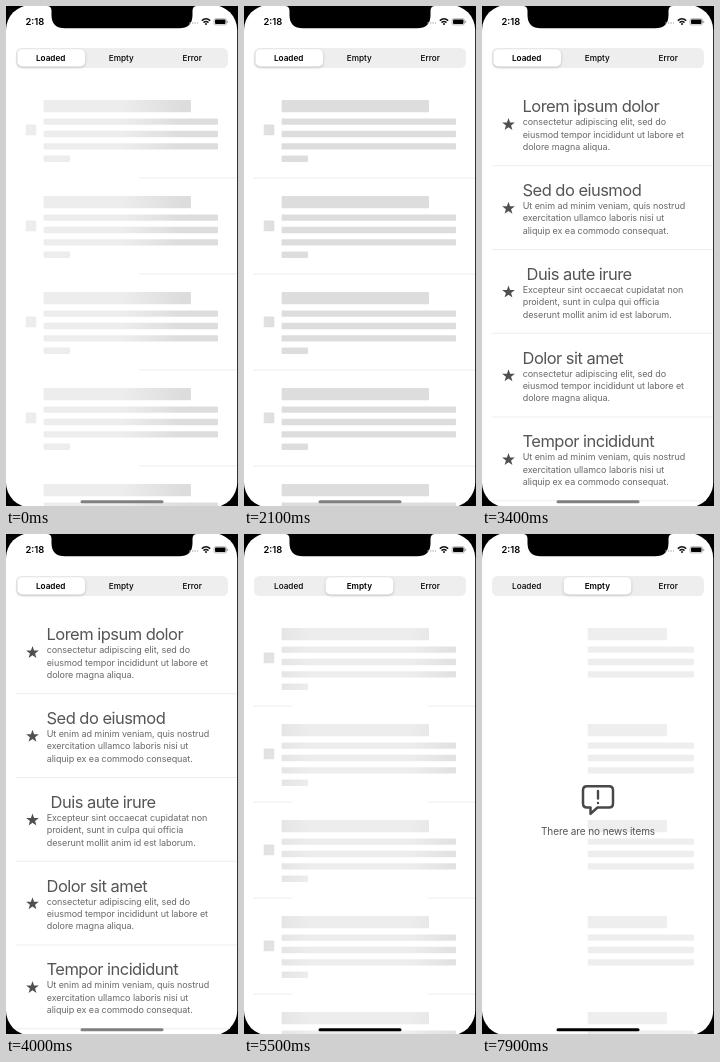
An HTML page for the animation above (8000 ms loop, 232 by 500 pixels).

```html
<!DOCTYPE html>
<html lang="en">
<head>
<meta charset="utf-8">
<style>
  html, body { margin: 0; width: 100%; height: 100%; overflow: hidden; background: #000; }
  svg { display: block; width: 232px; height: 500px; font-family: Inter, Roboto, sans-serif; }
  .tab { font-size: 8.2px; font-weight: 500; text-anchor: middle; }
  .title { font-size: 16.5px; letter-spacing: -.53px; fill: #555; white-space: pre; }
  .body { font-size: 9px; letter-spacing: -.07px; fill: #686868; }
  #thumb { filter: drop-shadow(0 1px 1.5px #0003); }
</style>
</head>
<body>
<svg viewBox="0 0 232 500">
  <defs>
    <linearGradient id="shine" gradientUnits="userSpaceOnUse">
      <stop stop-color="#ddd"/><stop stop-color="#ddd"/>
      <stop stop-color="#ddd"/><stop offset="1" stop-color="#ddd"/>
    </linearGradient>
    <linearGradient id="rule" gradientUnits="userSpaceOnUse">
      <stop stop-color="#ebebeb"/><stop stop-color="#fff"/>
      <stop offset="1" stop-color="#fff"/><stop offset="1" stop-color="#ebebeb"/>
    </linearGradient>
    <clipPath id="screen"><rect y="-1" width="231.2" height="502.5" rx="25"/></clipPath>
  </defs>
  <g clip-path="url(#screen)">
    <rect width="232" height="502" fill="#fff"/>
    <g id="skeleton"><g id="bars" fill="url(#shine)"></g><g id="barRules" fill="url(#rule)"></g></g>
    <g id="list"><g id="rows"></g><g id="rowRules" fill="#ebebeb"></g></g>
    <g id="empty">
      <path d="M105 252.3H127Q131 252.3 131 256.3V269.5Q131 273.5 127 273.5H115.5L108.5 279.8V273.5H105Q101 273.5 101 269.5V256.3Q101 252.3 105 252.3Z"
        fill="none" stroke="#484848" stroke-width="2.5" stroke-linejoin="round"/>
      <path d="M116 257V264.5M116 269V269.1" stroke="#484848" stroke-width="2.4" stroke-linecap="round"/>
      <text x="116" y="301" text-anchor="middle" font-size="10" letter-spacing="-.1" fill="#555">There are no news items</text>
    </g>
    <rect x="10" y="42" width="212" height="20" rx="5.5" fill="#eee"/>
    <rect id="thumb" y="43.3" width="67.5" height="17.2" rx="4.8" fill="#fff"/>
    <text class="tab" x="44.7" y="55">Loaded</text>
    <text class="tab" x="115.3" y="55">Empty</text>
    <text class="tab" x="186.2" y="55">Error</text>
    <path d="M41 0Q45.500 0 45.500 5V9Q45.500 22.300 59 22.300H173Q186.500 22.300 186.500 9V5Q186.500 0 191 0Z"/>
    <text x="19.500" y="19" font-size="9.400" font-weight="600">2:18</text>
    <path d="M183.500 17H192" stroke="#bbb" stroke-width="1.300" stroke-dasharray="1.300 1.200"/>
    <g fill="none" stroke="#111" stroke-width="1.500">
      <path d="M195.800 14.600Q200 10.900 204.200 14.600M197.500 16.600Q200 14.500 202.500 16.600"/>
      <path d="M199 18H201"/>
    </g>
    <rect x="208" y="12.700" width="12.500" height="6.200" rx="1.800" fill="none" stroke="#999" stroke-width=".7"/>
    <rect x="209" y="13.600" width="10.500" height="4.400" rx="1"/>
    <path d="M221.700 14.800V16.800" stroke="#999"/>
    <rect id="home" x="74.500" y="494.200" width="83" height="3" rx="1.500"/>
  </g>
</svg>
<script>
const $ = id => document.getElementById(id);
const rect = (x, y, w, h, r = 1) => `<rect x="${x}" y="${y}" width="${w}" height="${h}" rx="${r}"/>`;
const rules = (first, pitch, n) => Array.from({length: n}, (_, i) => rect(10, first + i * pitch, 221, .9, 0)).join('');

let bars = '';
for (let i = 0; i < 5; i++) {
  const y = 94 + 96 * i;
  bars += rect(37.6, y, 147.4, 12.3) + rect(19.7, y + 24.4, 10.6, 10.8) + rect(37.6, y + 55.6, 26.4, 6.4);
  for (let j = 0; j < 3; j++) bars += rect(37.6, y + 18.4 + 12.4 * j, 174.4, 6.4);
}
$('bars').innerHTML = bars;
$('barRules').innerHTML = rules(171.5, 96, 4);

const lorem = ['consectetur adipiscing elit, sed do', 'eiusmod tempor incididunt ut labore et', 'dolore magna aliqua.'];
const enim = ['Ut enim ad minim veniam, quis nostrud', 'exercitation ullamco laboris nisi ut', 'aliquip ex ea commodo consequat.'];
const sint = ['Excepteur sint occaecat cupidatat non', 'proident, sunt in culpa qui officia', 'deserunt mollit anim id est laborum.'];
const items = [['Lorem ipsum dolor', lorem], ['Sed do eiusmod', enim], [' Duis aute irure', sint],
  ['Dolor sit amet', lorem], ['Tempor incididunt', enim]];
const star = Array.from({length: 10}, (_, i) => {
  const r = i % 2 ? 2.7 : 6.7, a = i * Math.PI / 5;
  return [26.5 + r * Math.sin(a), 118.6 - r * Math.cos(a)].map(v => v.toFixed(2));
}).join(' ');
$('rows').innerHTML = items.map(([title, lines], i) => `<g transform="translate(0 ${i * 83.75})">
  <polygon points="${star}" fill="#505050"/><text class="title" x="40.500" y="106.300">${title}</text>
  ${lines.map((s, j) => `<text class="body" x="40.700" y="${119.4 + 12.3 * j}">${s}</text>`).join('')}</g>`).join('');
$('rowRules').innerHTML = rules(159.3, 83.75, 5);

const tabs = document.querySelectorAll('.tab');
const clamp = v => Math.max(0, Math.min(1, v));
const mix = (a, b, k) => a + (b - a) * k;
const ease = (t, from, to) => { const k = clamp((t - from) / (to - from)); return k * k * (3 - 2 * k); };

// A pale band centred on c; it hardens and clears as the placeholder fades out.
function shimmer(c, fade) {
  const k = clamp(2 * (1 - fade)), end = mix(110, 70, k), flat = mix(50, 69, k);
  const set = (id, half) => {
    $(id).setAttribute('x1', c - half);
    $(id).setAttribute('x2', c + half);
  };
  set('shine', end);
  set('rule', 68);
  const [, a, b] = $('shine').children;
  a.setAttribute('offset', (end - flat) / (2 * end));
  b.setAttribute('offset', (end + flat) / (2 * end));
  for (const s of [a, b]) s.setAttribute('stop-opacity', .53 * (1 - k));
}

function draw(t) {
  const second = t >= 4100;
  const fade = second ? ease(t, 4100, 4500) * (1 - .5 * ease(t, 7400, 7900)) : 1 - ease(t, 2800, 3250);
  const list = ease(t, 2800, 3250) * (1 - ease(t, 4100, 4500));
  const travel = second ? (t - 4100) * .2 : t * .2 + 229;
  shimmer(travel % 560 - 164, second && t < 4500 ? 1 : fade);
  $('bars').setAttribute('opacity', fade);
  $('barRules').setAttribute('opacity', clamp(2 * fade - 1));
  $('rows').setAttribute('opacity', list);
  $('rowRules').setAttribute('opacity', clamp(2 * list - 1));
  $('empty').setAttribute('opacity', ease(t, 7290, 7800));
  $('thumb').setAttribute('x', mix(11.5, 81.7, ease(t, 4020, 4360)));
  tabs[0].style.fontWeight = t < 4050 ? 600 : 500;
  tabs[1].style.fontWeight = t < 4350 ? 500 : 600;
  $('home').setAttribute('fill', t < 4050 ? '#808080' : '#000');
}

const start = performance.now();
function tick() {
  draw((performance.now() - start) % 8000);
  requestAnimationFrame(tick);
}
tick();
</script>
</body>
</html>
```
